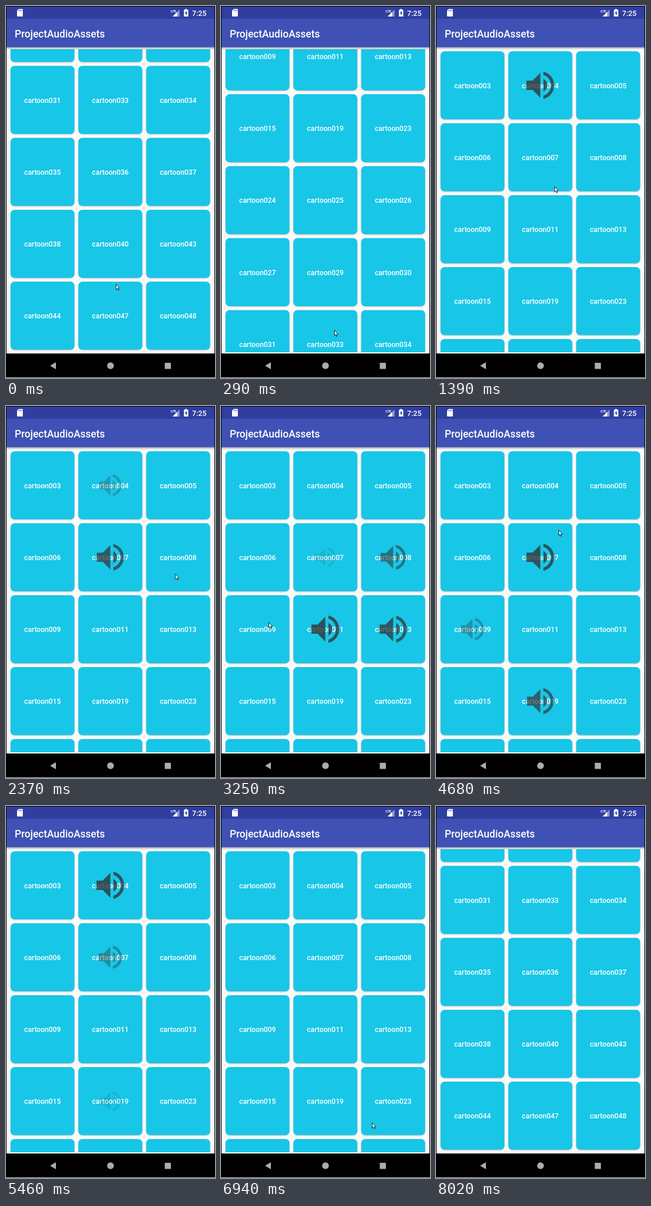
Write an HTML page with a canvas that moves like this. It is 360 px wide and 637 px high and loops after 8270 ms.

```html
<!DOCTYPE html>
<html lang="en">
<head>
<meta charset="utf-8">
<title>Sound grid</title>
<style>
html, body { margin: 0; width: 100%; height: 100%; overflow: hidden; background: #000; }
canvas { display: block; width: 360px; height: 637px; }
</style>
</head>
<body>
<canvas id="stage"></canvas>
<script>
const W = 360, H = 637, LOOP = 8270;
const canvas = document.getElementById('stage');
const c = canvas.getContext('2d');
const dpr = window.devicePixelRatio || 1;
canvas.width = W * dpr;
canvas.height = H * dpr;

const FONT = 'Roboto, "Open Sans", sans-serif';
const CARD = { x: 7.8, y: 77.5, w: 110.1, h: 116.5, dx: 116.85, dy: 123.2 };
const MAX_SCROLL = 6 * CARD.dy - 25;
const FADE = 1450;

// Sounds 003 to 048, with gaps in the numbering
const GAPS = '10 12 14 16 17 18 20 21 22 28 32 39 41 42 45 46'.split(' ');
const LABELS = [];
for (let n = 3; n <= 48; n++) {
  if (!GAPS.includes(String(n))) LABELS.push('cartoon' + String(n).padStart(3, '0'));
}

// Pointer stops: time, x, y and whether it taps the card there
const TAP = true;
const STOPS = [
  [0, 189, 476], [300, 195, 555],
  [1220, 200, 165, TAP], [1390, 204, 309], [1920, 204, 309, TAP],
  [2480, 300, 285, TAP], [2850, 300, 395, TAP], [3080, 200, 395, TAP],
  [3250, 82, 370], [3600, 80, 375, TAP], [4130, 180, 520, TAP],
  [4440, 209, 220, TAP], [4680, 211, 212], [5230, 200, 150, TAP],
  [5440, 240, 640], [6050, 300, 640], [6940, 260, 542],
  [7200, 255, 330], [7900, 265, 640], [LOOP, 265, 640]
];
const TAPS = STOPS.filter(s => s[3]).map(([time, x, y]) => ({
  time,
  card: Math.floor((x - CARD.x) / CARD.dx) + 3 * Math.floor((y - CARD.y) / CARD.dy)
}));

const SPEAKER = new Path2D('M3 9v6h4l5 5V4L7 9H3zm13.5 3c0-1.77-1.02-3.29-2.5-4.03v8.05' +
  'c1.48-.73 2.5-2.25 2.5-4.02zM14 3.23v2.06c2.89.86 5 3.54 5 6.71s-2.11 5.85-5 6.71v2.06' +
  'c4.01-.91 7-4.49 7-8.77s-2.99-7.86-7-8.77z');
const ARROW = new Path2D('M.5 .5V9.5L2.5 7.7L4 11L5.3 10.4L3.9 7.2H6.5Z');
const SD_CARD = new Path2D('M22 5H28Q29 5 29 6V17Q29 18 28 18H20Q19 18 19 17V8Z');
const BATTERY = new Path2D('M308.5 5H311.5V6.5H314V18H306.5V6.5H308.5Z');
const BOLT = new Path2D('M311 8L308 12.8H309.8V16.5L312.7 11.6H311Z');
const SIGNAL = new Path2D('M299 6V18H287Z');
const SIGNAL_LEVEL = new Path2D('M295 10V18H287Z');
const BACK = new Path2D('M86 610V622L76 616Z');

const clamp = x => Math.max(0, Math.min(1, x));
const progress = (t, from, to) => clamp((t - from) / (to - from));
const smooth = x => (1 - Math.cos(Math.PI * x)) / 2;
const easeOut = x => 1 - (1 - x) ** 3;

function box(x, y, w, h, fill) {
  c.fillStyle = fill;
  c.fillRect(x, y, w, h);
}

function fillPath(path, fill) {
  c.fillStyle = fill;
  c.fill(path);
}

function label(text, x, y, size, align = 'left', weight = 500) {
  c.font = `${weight} ${size}px ${FONT}`;
  c.textAlign = align;
  c.fillStyle = '#fff';
  c.fillText(text, x, y);
}

// Flung up to the first row, later back down to the last
function scrollAt(t) {
  const up = easeOut(progress(t, 90, 880));
  const down = easeOut(progress(t, 7000, 7640));
  return MAX_SCROLL * (1 - up + down);
}

function cardPos(i, scroll) {
  return [CARD.x + i % 3 * CARD.dx, CARD.y + Math.floor(i / 3) * CARD.dy - scroll];
}

function drawCards(scroll) {
  LABELS.forEach((name, i) => {
    const [x, y] = cardPos(i, scroll);
    if (y > 600 || y + CARD.h < 65) return;
    c.save();
    c.shadowColor = 'rgba(0,0,0,.25)';
    c.shadowBlur = 2 * dpr;
    c.shadowOffsetY = dpr;
    c.fillStyle = '#18c6e7';
    c.beginPath();
    c.roundRect(x, y, CARD.w, CARD.h, 7);
    c.fill();
    c.restore();
    label(name, x + CARD.w / 2, y + 63.1, 12.25, 'center');
  });
}

function drawSpeakers(t, scroll) {
  for (const { time, card } of TAPS) {
    const age = (t - time) / FADE;
    if (age < 0 || age >= 1) continue;
    const left = 1 - age * age;
    const [x, y] = cardPos(card, scroll);
    const size = 2.67 * (0.68 + 0.32 * left);
    c.save();
    c.translate(x + CARD.w / 2, y + CARD.h / 2);
    c.scale(size, size);
    c.translate(-12, -12);
    c.globalAlpha = 0.8 * left;
    fillPath(SPEAKER, '#333');
    c.restore();
  }
}

// Edge glow when the list hits its lower end
function drawGlow(t) {
  const power = progress(t, 7480, 7620) * (1 - progress(t, 7650, 8000));
  if (!power) return;
  c.fillStyle = `rgba(63,81,181,${0.28 * power})`;
  c.beginPath();
  c.moveTo(5, 593);
  c.quadraticCurveTo(180, 593 - 84 * power, 355, 593);
  c.fill();
}

function drawBars() {
  const shade = c.createLinearGradient(0, 70, 0, 75);
  shade.addColorStop(0, 'rgba(0,0,0,.35)');
  shade.addColorStop(1, 'rgba(0,0,0,0)');
  box(1, 70, 358, 5, shade);
  box(1, 1, 358, 21, '#303f9f');
  box(1, 22, 358, 48.5, '#3f51b5');
  label('ProjectAudioAssets', 15, 53.5, 17.5);

  fillPath(SD_CARD, '#fff');
  for (let x = 22; x < 27; x += 2.3) box(x, 6.5, 1, 2.5, '#303f9f');
  label('LTE', 283.5, 11, 6, 'left', 700);
  fillPath(SIGNAL, '#8c95cb');
  fillPath(SIGNAL_LEVEL, '#fff');
  fillPath(BATTERY, '#fff');
  fillPath(BOLT, '#303f9f');
  label('7:25', 320.5, 17, 12.6);

  const grey = '#adadad';
  box(0, 595, W, 42, '#000');
  fillPath(BACK, grey);
  c.beginPath();
  c.arc(180, 616, 5.8, 0, 7);
  c.fill();
  box(273.5, 611, 10.5, 10.5, grey);
  box(0, H - 1, W, 1, '#ccc');
}

function drawPointer(t) {
  const n = STOPS.findIndex(s => s[0] > t);
  const [t0, x0, y0] = STOPS[n - 1], [t1, x1, y1] = STOPS[n];
  const k = smooth(progress(t, t0, t1));
  c.save();
  c.translate(x0 + (x1 - x0) * k, y0 + (y1 - y0) * k);
  fillPath(ARROW, '#fff');
  c.strokeStyle = '#000';
  c.lineWidth = 0.8;
  c.stroke(ARROW);
  c.restore();
}

function draw(t) {
  const scroll = scrollAt(t);
  c.setTransform(dpr, 0, 0, dpr, 0, 0);
  box(0, 0, W, H, '#000');
  box(1, 70, 358, 525, '#fafafa');
  c.save();
  c.beginPath();
  c.rect(1, 74, 358, 519);
  c.clip();
  drawCards(scroll);
  drawSpeakers(t, scroll);
  drawGlow(t);
  c.restore();
  drawBars();
  drawPointer(t);
}

const start = performance.now();
function tick() {
  draw((performance.now() - start) % LOOP);
  requestAnimationFrame(tick);
}
tick();
</script>
</body>
</html>
```
